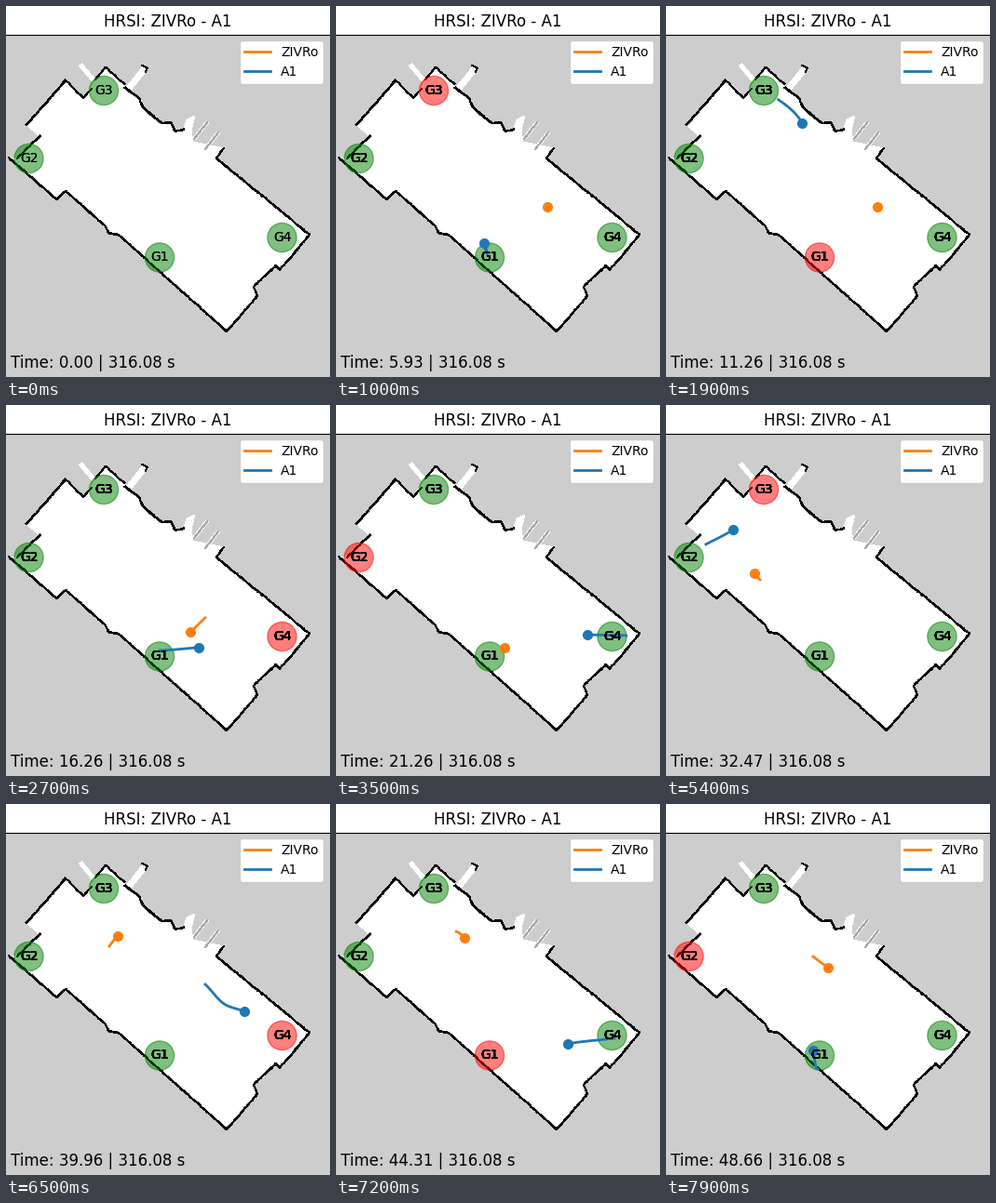
Animation, 348 px wide and 399 px high, one loop 8000 ms. Source, as a matplotlib script:

```python
import numpy as np
import matplotlib.pyplot as plt
from matplotlib.animation import FuncAnimation
from matplotlib.patches import Circle, Polygon, Rectangle

W, H, DPI, TOP = 348, 399, 100, 30.5
FRAMES, INTERVAL = 80, 100
TRAIL = 2.6          # trail length in frames
COPIES = 14          # stacked label copies, edges darken over time
ROBOT, HUMAN = "ZIVRo", "A1"

plt.rcParams["font.family"] = "DejaVu Sans"
rng = np.random.default_rng(4)

fig = plt.figure(figsize=(W / DPI, H / DPI), dpi=DPI, facecolor="white")
ax = fig.add_axes([0, 0, 1, 1])
ax.set_xlim(0, W)
ax.set_ylim(H, 0)
ax.axis("off")


def fill(points, color="white"):
    ax.add_patch(Polygon(points, fc=color, ec="none", lw=0, zorder=1, aa=False))


def strip(a, b, width):
    """White bar from a to b."""
    a, b = np.array(a, float), np.array(b, float)
    side = np.array([a[1] - b[1], b[0] - a[0]]) / np.hypot(*(b - a)) * width / 2
    fill([a + side, b + side, b - side, a - side])


def wall(points, passes=2, jitter=0.5, color="black"):
    """Rough occupancy-grid wall along a polyline."""
    p = np.array(points, float)
    d = np.r_[0, np.cumsum(np.hypot(*np.diff(p, axis=0).T))]
    s = np.union1d(np.arange(0, d[-1], 3.0), d)
    for _ in range(passes):
        xy = np.array([np.interp(s, d, p[:, i]) for i in (0, 1)])
        xy += rng.uniform(-jitter, jitter, xy.shape)
        ax.plot(*xy, color=color, lw=0.72, zorder=2, aa=False)


# Floor map
ax.add_patch(Rectangle((0, TOP), W, H - TOP, fc="#cdcdcd", lw=0, zorder=0))
ax.plot([0, W], [TOP, TOP], color="black", lw=0.8, zorder=3)

south = [(3, 163), (54, 208), (64, 199), (107, 237), (110, 244), (121, 246), (237, 350)]
east = [(237, 350), (270, 312), (266, 302), (290, 279), (294, 284), (326, 246)]
northeast = [(326, 246), (280, 208), (226, 164), (234, 153)]
bumps = [(191, 133), (182, 135), (177, 125), (167, 126), (147, 109), (143, 99), (128, 88)]
north = [(128, 88), (107, 66), (83, 99), (64, 80)]
west = [(64, 80), (22, 128), (36, 140), (12, 164)]
fill(south + east + northeast + [(201, 146)] + bumps + north + west)

# Open doorways and sensor rays
strip((130, 91), (150, 66), 6)
strip((80, 63), (94, 80), 4)
fill([(190, 134), (194, 122), (203, 118), (199, 133), (201, 147)])
for tip in ((216, 125), (228, 136)):
    foot = (tip[0] - 14, tip[1] + 18)
    strip(tip, foot, 3)
    wall([tip, foot], 1, 0.3, "#a8a8a8")

for line in (south, east, northeast, bumps, west[:2], west[2:]):
    wall(line)
wall(bumps)
for line in ([(127, 84), (107, 66), (96, 79)], [(92, 89), (83, 99), (64, 80)],
             [(146, 64), (152, 67), (150, 71)]):
    wall(line, 1)

# Texts and legend
ax.text(W / 2, TOP - 8.3, f"HRSI: {ROBOT} - {HUMAN}", fontsize=12, ha="center", zorder=9)
clock = ax.text(5, 389, "", fontsize=12, zorder=9)
keys = [ax.plot([], [], color=c, lw=2, label=n)[0]
        for n, c in ((ROBOT, "C1"), (HUMAN, "C0"))]
ax.legend(handles=keys, loc="upper right", fontsize=10, framealpha=1,
          bbox_to_anchor=(0, 0, 1, (H - TOP) / H)).set_zorder(8)

# Goals, each active from its start on
goals, labels = {}, []
for name, x, y in (("G1", 165, 270.5), ("G2", 24.5, 164),
                   ("G3", 105, 91), ("G4", 296.5, 249)):
    goals[name] = ax.add_patch(Circle((x, y), 15.6, color="green", alpha=0.5, zorder=3))
    labels.append([ax.text(x, y, name, fontsize=10, ha="center", va="center", zorder=7)
                   for _ in range(COPIES)])
TOUR = [(1, "G1"), (10, "G3"), (16, "G1"), (25, "G4"), (32, "G2"),
        (49, "G3"), (58, "G4"), (68, "G1"), (78, "G2")]


def make_path(points):
    """Monotone cubic path through (frame, x, y) key points."""
    keys = np.array(points, float)
    t, p = keys[:, 0], keys[:, 1:]
    dt = np.diff(t)[:, None]
    slope = np.diff(p, axis=0) / dt
    a, b = slope[:-1], slope[1:]
    same = a * b > 0
    mean = np.where(same, 2 * a * b / np.where(same, a + b, 1), 0)
    m = np.vstack([slope[:1], mean, slope[-1:]])

    def path(q):
        q = np.clip(q, t[0], t[-1])
        i = np.clip(np.searchsorted(t, q, "right") - 1, 0, len(dt) - 1)
        h = dt[i]
        u = (q - t[i])[:, None] / h
        v = 1 - u
        return (v * v * ((1 + 2 * u) * p[i] + u * h * m[i])
                + u * u * ((1 + 2 * v) * p[i + 1] - v * h * m[i + 1]))

    return path


robot_path = make_path([
    (22, 227, 216), (32, 181, 261), (37, 181, 261), (47, 134, 228), (51.4, 101, 188),
    (54, 95, 181), (62.4, 111, 153), (65, 120, 142), (69, 128, 137),
    (76.4, 158, 164), (79, 174, 176)])
human_path = make_path([
    (1, 120, 140), (9, 163, 268), (15, 113, 96), (19, 146, 126), (24.5, 166, 264),
    (32.5, 312, 248), (35, 270, 247), (44.4, 77, 173), (47, 53, 160), (50, 36, 155),
    (54, 72, 134), (57, 108, 102), (62.4, 214, 194), (64, 236, 216), (65, 256, 223),
    (68, 311, 248), (72, 249, 258), (76.4, 163, 285), (79, 158, 265)])

movers = []
for path, color in ((robot_path, "C1"), (human_path, "C0")):
    trail, = ax.plot([], [], color=color, lw=2, zorder=4)
    dot, = ax.plot([], [], "o", color=color, ms=7, zorder=5)
    movers.append((path, trail, dot))


def update(k):
    seconds = np.interp(k, [0, 19, 35, 47, 54, 65, 79],
                        [0, 11.26, 21.26, 28.18, 32.47, 39.96, 48.66])
    clock.set_text(f"Time: {seconds:.2f} | 316.08 s")
    active = next((name for start, name in reversed(TOUR) if k >= start), None)
    for name, disc in goals.items():
        disc.set_color("red" if name == active else "green")
    for stack in labels:
        for i, label in enumerate(stack):
            label.set_visible(i <= k + 1)
    for path, trail, dot in movers:
        xy = path(np.linspace(max(k - TRAIL, 1), k, 24)) if k else np.empty((0, 2))
        trail.set_data(*xy.T)
        dot.set_data(*xy[-1:].T)
    return []


anim = FuncAnimation(fig, update, frames=FRAMES, interval=INTERVAL,
                     repeat=True, repeat_delay=0, blit=False)
plt.show()
```
